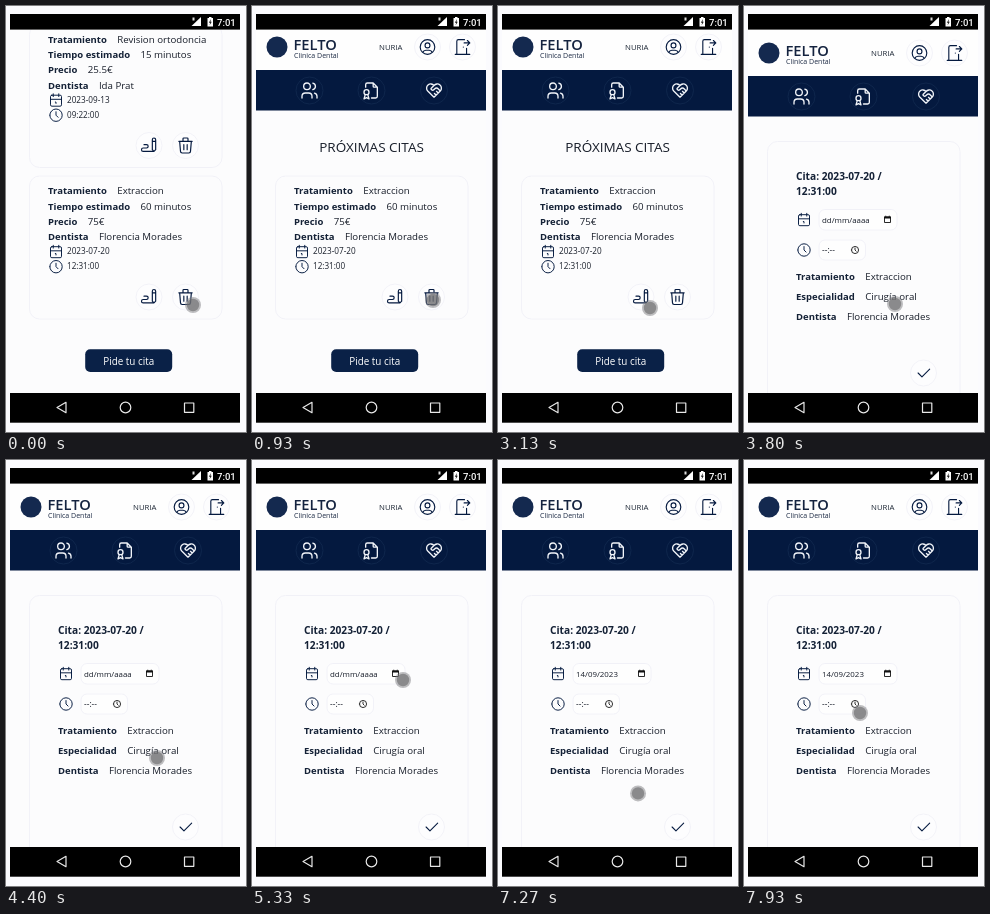
Write an HTML page with a canvas that moves like this. It is 240 by 426 pixels and loops after 8 s.

```html
<!DOCTYPE html>
<html lang="es">
<head>
<meta charset="utf-8">
<title>Citas</title>
<style>
  html, body { margin: 0; width: 100%; height: 100%; overflow: hidden; background: #fbfbfe; }
  canvas { display: block; width: 240px; height: 426px; }
</style>
</head>
<body>
<canvas id="stage"></canvas>
<script>
const W = 240, H = 426, LOOP = 8000;
const DELETE_AT = 650, EDIT_AT = 3700, PICKER_OPEN = 5750, DATE_SET = 7100;
const NAVY = '#04193f', INK = '#171d29', BOLD = '#142136', LINE = '#efeff7';
const FONT = '"Open Sans", "Noto Sans", sans-serif';

const canvas = document.getElementById('stage');
const ctx = canvas.getContext('2d');
const dpr = window.devicePixelRatio || 1;
canvas.width = Math.round(W * dpr);
canvas.height = Math.round(H * dpr);

// Icons on a 24-unit grid
const ICONS = {
  users: 'M5 7a4 4 0 1 0 8 0a4 4 0 1 0-8 0M3 21v-2a4 4 0 0 1 4-4h4a4 4 0 0 1 4 4v2M16 3.1a4 4 0 0 1 0 7.8M21 21v-2a4 4 0 0 0-3-3.9',
  certificate: 'M14 3v4a1 1 0 0 0 1 1h4M5 8v-3a2 2 0 0 1 2-2h7l5 5v11a2 2 0 0 1-2 2h-5M3 14a3 3 0 1 0 6 0a3 3 0 1 0-6 0M4.5 17l-1.5 5l3-1.5l3 1.5l-1.5-5',
  heart: 'M19.5 12.6l-7.5 7.4l-7.5-7.4a5 5 0 1 1 7.5-6.6a5 5 0 1 1 7.5 6.6M12 6l-3.3 3.3a1 1 0 0 0 0 1.4l.5.5c.7.7 1.8.7 2.5 0l1-1a3.2 3.2 0 0 1 4.5 0l2.3 2.3M12.5 15.5l2 2M15 13l2 2',
  user: 'M3 12a9 9 0 1 0 18 0a9 9 0 1 0-18 0M9 10a3 3 0 1 0 6 0a3 3 0 1 0-6 0M6.2 18.8a4 4 0 0 1 3.8-2.8h4a4 4 0 0 1 3.8 2.8',
  exit: 'M13 12v.1M3 21h18M5 21v-16a2 2 0 0 1 2-2h7.5M17 13.5v7.5M14 7h7M18 4l3 3l-3 3',
  calendar: 'M6 5h12a2 2 0 0 1 2 2v12a2 2 0 0 1-2 2h-12a2 2 0 0 1-2-2v-12a2 2 0 0 1 2-2zM16 3v4M8 3v4M4 11h16M11 15h1v2',
  clock: 'M3 12a9 9 0 1 0 18 0a9 9 0 1 0-18 0M12 7v5l3 3',
  trash: 'M4 7h16M10 11v6M14 11v6M5 7l1 12a2 2 0 0 0 2 2h8a2 2 0 0 0 2-2l1-12M9 7v-3a1 1 0 0 1 1-1h4a1 1 0 0 1 1 1v3',
  edit: 'M20 17v-12c0-1.1-.9-2-2-2s-2 .9-2 2v12l2 2l2-2zM16 7h4M18 19h-13a2 2 0 1 1 0-4h4a2 2 0 1 0 0-4h-3',
  check: 'M5 12l5 5l10-10'
};
for (const name in ICONS) ICONS[name] = new Path2D(ICONS[name]);

const APPOINTMENTS = [
  { rows: [['Tratamiento', 'Revision ortodoncia'], ['Tiempo estimado', '15 minutos'],
           ['Precio', '25.5€'], ['Dentista', 'Ida Prat']], date: '2023-09-13', time: '09:22:00' },
  { rows: [['Tratamiento', 'Extraccion'], ['Tiempo estimado', '60 minutos'],
           ['Precio', '75€'], ['Dentista', 'Florencia Morades']], date: '2023-07-20', time: '12:31:00' }
];

// Pointer path: time, x, y
const POINTER = [
  [0, 187, 299], [250, 181, 294], [950, 181, 294], [1750, 182, 207], [2150, 182, 207],
  [2950, 152, 302], [3130, 152, 302], [3500, 151, 298], [4500, 151, 298], [5200, 151, 220],
  [5330, 151, 220], [5600, 146, 215], [5800, 146, 215], [6500, 145, 350], [7100, 145, 350],
  [7750, 116, 253], [8000, 116, 253]
];

function rect(x, y, w, h, color) {
  ctx.fillStyle = color;
  ctx.fillRect(x, y, w, h);
}

function text(str, x, y, size, color = INK, weight = 400, align = 'left') {
  ctx.font = `${weight} ${size}px ${FONT}`;
  ctx.textAlign = align;
  ctx.fillStyle = color;
  ctx.fillText(str, x, y);
  return ctx.measureText(str).width;
}

function icon(name, cx, cy, size = 20, color = NAVY, weight = 1.4) {
  ctx.save();
  ctx.translate(cx - size / 2, cy - size / 2);
  ctx.scale(size / 24, size / 24);
  ctx.strokeStyle = color;
  ctx.lineWidth = weight;
  ctx.lineCap = ctx.lineJoin = 'round';
  ctx.stroke(ICONS[name]);
  ctx.restore();
}

function circle(x, y, r, fill, stroke, weight = 0.8) {
  ctx.beginPath();
  ctx.arc(x, y, r, 0, Math.PI * 2);
  if (fill) { ctx.fillStyle = fill; ctx.fill(); }
  if (stroke) { ctx.strokeStyle = stroke; ctx.lineWidth = weight; ctx.stroke(); }
}

function box(x, y, w, h, r, fill, stroke) {
  ctx.beginPath();
  ctx.roundRect(x, y, w, h, r);
  if (fill) { ctx.fillStyle = fill; ctx.fill(); }
  if (stroke) { ctx.strokeStyle = stroke; ctx.lineWidth = 0.8; ctx.stroke(); }
}

function iconButton(name, x, y, size) {
  circle(x, y, 13, '#fdfdfe', '#f0f0f6');
  icon(name, x, y, size);
}

function field(label, value, x, y) {
  const w = text(label, x, y, 9.5, BOLD, 700);
  text(value, x + w + 10.4, y, 9.7);
}

function header(top) {
  rect(4, top, 230, 46, '#fefefe');
  circle(25, top + 23, 10.5, '#14294f');
  text('FELTO', 41.5, top + 25.5, 14.7, '#14233f', 600);
  text('Clinica Dental', 42, top + 34, 7, '#1c2a44');
  text('NURIA', 127, top + 26, 7.8, '#1e2836');
  iconButton('user', 175.5, top + 23, 19.5);
  iconButton('exit', 210.5, top + 23, 19.5);
  rect(4, top + 46, 230, 40.5, NAVY);
  [['users', 57.5], ['certificate', 119.5], ['heart', 182]].forEach(([name, x]) => {
    circle(x, top + 66.5, 13.5, null, '#122a50');
    icon(name, x, top + 66.5, 20, '#f2f5fa', 1.6);
  });
}

function card(item, top) {
  box(23.5, top, 192.5, 143, 10, '#fcfcfd', LINE);
  item.rows.forEach(([label, value], i) => field(label, value, 42, top + 18.2 + i * 15.3));
  icon('calendar', 50, top + 75.5, 16.5);
  text(item.date, 61, top + 78, 8.2);
  icon('clock', 50, top + 90.7, 16.5);
  text(item.time, 61, top + 93.4, 8.1);
  iconButton('edit', 143, top + 121);
  iconButton('trash', 179.5, top + 121);
}

function listPage(items) {
  // Page rests at its lower scroll limit, so the last card stays put
  const step = 151.5, extra = (items.length - 1) * step;
  header(18 - extra);
  text('PRÓXIMAS CITAS', 119.5, 146 - extra, 13.5, INK, 500, 'center');
  items.forEach((item, i) => card(item, 170 - extra + i * step));
  box(79.2, 343.2, 87, 22.8, 5, '#0a2147');
  text('Pide tu cita', 122.7, 359, 9.9, '#fff', 400, 'center');
}

function pickerCalendar(x, y) {
  ctx.strokeStyle = '#111';
  ctx.lineWidth = 0.9;
  ctx.strokeRect(x - 3, y - 2.5, 6, 5.5);
  rect(x - 3.4, y - 3, 6.8, 2, '#111');
  rect(x - 2.2, y - 3.8, 0.9, 1, '#111');
  rect(x + 1.3, y - 3.8, 0.9, 1, '#111');
}

function formPage(date) {
  header(24);
  box(23.5, 135.5, 192.5, 280, 10, '#fcfcfd', LINE);
  text('Cita: 2023-07-20 /', 52, 174.3, 10.2, BOLD, 700);
  text('12:31:00', 52, 189.3, 10.2, BOLD, 700);
  icon('calendar', 60, 213.5, 16.5);
  box(75, 203.5, 78, 20.5, 6, '#fefefe', LINE);
  text(date, 78, 216.5, 7.9);
  pickerCalendar(143.5, 213.5);
  icon('clock', 60, 244, 16.5);
  box(75, 234, 46.5, 20, 6, '#fefefe', LINE);
  text('--:--', 78, 246.8, 8.4);
  icon('clock', 111, 244, 9.5, '#111', 2.2);
  field('Tratamiento', 'Extraccion', 52, 273.7);
  field('Especialidad', 'Cirugía oral', 52, 294);
  field('Dentista', 'Florencia Morades', 52, 314.4);
  iconButton('check', 179.5, 367, 18.5);
}

function poly(points, fill, stroke, weight = 1) {
  ctx.beginPath();
  points.forEach(([x, y]) => ctx.lineTo(x, y));
  ctx.closePath();
  if (fill) { ctx.fillStyle = fill; ctx.fill(); }
  if (stroke) { ctx.strokeStyle = stroke; ctx.lineWidth = weight; ctx.lineJoin = 'round'; ctx.stroke(); }
}

function systemBars() {
  rect(4, 8, 230, 15.6, '#000');
  poly([[195, 11], [195, 20], [185.5, 20]], '#fff');
  rect(186.5, 11.5, 2, 3, '#ddd');
  rect(201.5, 12, 5.5, 8.5, '#fff');
  rect(203, 11, 2.5, 1, '#fff');
  poly([[205, 13], [202.8, 16.7], [204.1, 16.7], [203.6, 19.3], [205.8, 15.7], [204.5, 15.7]], '#222');
  ctx.font = '500 9.5px Roboto, sans-serif';
  ctx.textAlign = 'left';
  ctx.fillStyle = '#fff';
  ctx.fillText('7:01', 211, 19.7);
  rect(4, 387, 230, 29.7, '#000');
  poly([[51, 401.5], [60, 396.3], [60, 406.7]], null, '#e8e8e8', 1.2);
  circle(119.5, 401.5, 5.3, null, '#e8e8e8', 1.2);
  ctx.strokeRect(178.5, 397, 9.3, 9.3);
}

function pointerAt(t) {
  const i = Math.max(1, POINTER.findIndex(p => p[0] > t));
  const [t0, x0, y0] = POINTER[i - 1], [t1, x1, y1] = POINTER[i];
  const u = (t - t0) / (t1 - t0), e = u * u * (3 - 2 * u);
  return [x0 + (x1 - x0) * e, y0 + (y1 - y0) * e];
}

function pointer(t) {
  const [x, y] = pointerAt(t);
  if (t > PICKER_OPEN && t < DATE_SET) {
    const shape = [[0, 0], [0, 10], [2.3, 7.9], [3.9, 11.5], [5.5, 10.8], [3.9, 7.3], [7, 7.1]];
    poly(shape.map(([dx, dy]) => [x - 0.5 + dx, y - 0.5 + dy]), '#fff', '#222', 0.8);
  } else {
    circle(x, y, 8, 'rgba(125,125,130,.5)');
    circle(x, y, 6.2, 'rgba(110,110,112,.65)');
  }
}

function draw(t) {
  ctx.setTransform(dpr, 0, 0, dpr, 0, 0);
  rect(0, 0, W, H, '#fbfbfe');
  ctx.save();
  ctx.beginPath();
  ctx.rect(4, 23, 230, 364);
  ctx.clip();
  rect(4, 23, 230, 364, '#fcfcfd');
  if (t < EDIT_AT) listPage(t < DELETE_AT ? APPOINTMENTS : APPOINTMENTS.slice(1));
  else formPage(t < DATE_SET ? 'dd/mm/aaaa' : '14/09/2023');
  ctx.restore();
  systemBars();
  pointer(t);
}

const start = performance.now();
function tick() {
  draw((performance.now() - start) % LOOP);
  requestAnimationFrame(tick);
}
tick();
</script>
</body>
</html>
```
